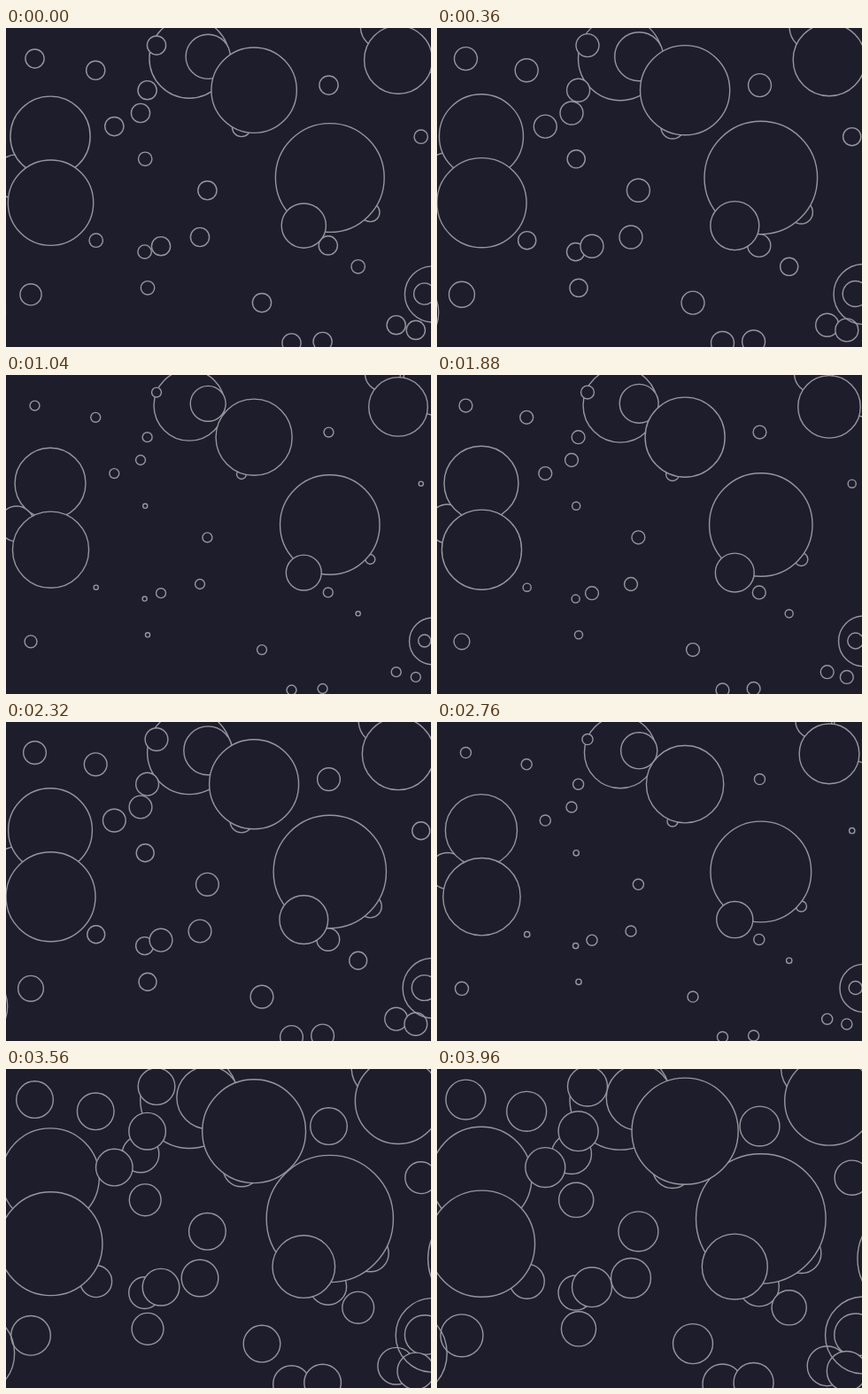
An HTML page with a canvas for the animation above (4.04 s loop, 480 by 360 pixels).

```html
<!DOCTYPE html>
<html lang="en">
<head>
<meta charset="utf-8">
<title>Breathing bubbles</title>
<style>
html, body { margin: 0; width: 100%; height: 100%; overflow: hidden; background: #1e1d2b; }
canvas { display: block; }
</style>
</head>
<body>
<canvas id="stage" width="480" height="360"></canvas>
<script>
const ctx = document.getElementById('stage').getContext('2d');
const LOOP = 4040, TICK = 40, GROWN = 17.6;
const TINY = 2.3, SMALL = 5.2, MEDIUM = 19.7, LARGE = 39.7, HUGE = 42.8;

// resting radius, then centres; later groups cover earlier ones
const groups = [
  [SMALL, [266, 112], [411.4, 208], [363.8, 245.4]],
  [TINY, [101.7, 239.7], [157.2, 147.8], [160, 293.3], [156.6, 252.6], [397.7, 269.3], [468.7, 122.7]],
  [MEDIUM, [12, 168], [425.5, -1.5]],
  [LARGE, [207, 34.2], [50, 122.2], [489, 6]],
  [HUGE, [50.5, 197.2], [535, 214]],
  [56, [365.8, 169]],
  [MEDIUM, [228.2, 32.3], [336.3, 223.1]],
  [HUGE, [280.1, 70.2]],
  [33, [443, 35.9]],
  [6.7, [28, 300.8], [472.7, 300]],
  [SMALL, [170, 19.6], [152, 96], [159.6, 70.2], [122.3, 111.1], [101.2, 47.8], [32.5, 34.6],
    [227.4, 183.3], [175, 246.2], [219, 236], [289, 310.1], [322.5, 355.5], [357.6, 354],
    [364.5, 64.6], [440.7, 335.2], [462.8, 340.9]]
];
const rings = [[26.2, [482, 300.4]], [33, [-39, 321]]];

// start time and the swelling approached from then on
const goals = [[40, GROWN], [257, 0], [1850, GROWN], [2200, 0], [3080, GROWN]];

function swelling(t) {
  let size = 5.4;
  goals.forEach(([start, goal], i) => {
    if (t <= start) return;
    const end = i + 1 < goals.length ? goals[i + 1][0] : LOOP;
    const tau = goal ? 221 : 200;
    size = goal + (size - goal) * Math.exp(-(Math.min(t, end) - start) / tau);
  });
  return size;
}

function circles([radius, ...centres], extra, filled) {
  for (const [x, y] of centres) {
    ctx.beginPath();
    ctx.arc(x, y, radius + extra, 0, 2 * Math.PI);
    if (filled) ctx.fill();
    ctx.stroke();
  }
}

function draw(now) {
  const extra = swelling(Math.floor(now % LOOP / TICK) * TICK);
  ctx.fillStyle = '#1e1d2b';
  ctx.fillRect(0, 0, 480, 360);
  ctx.strokeStyle = '#9796a0';
  ctx.lineWidth = 1.4;
  groups.forEach(g => circles(g, extra, true));
  rings.forEach(g => circles(g, extra, false));
}

const begin = performance.now();
function frame() {
  draw(performance.now() - begin);
  requestAnimationFrame(frame);
}
frame();
</script>
</body>
</html>
```
